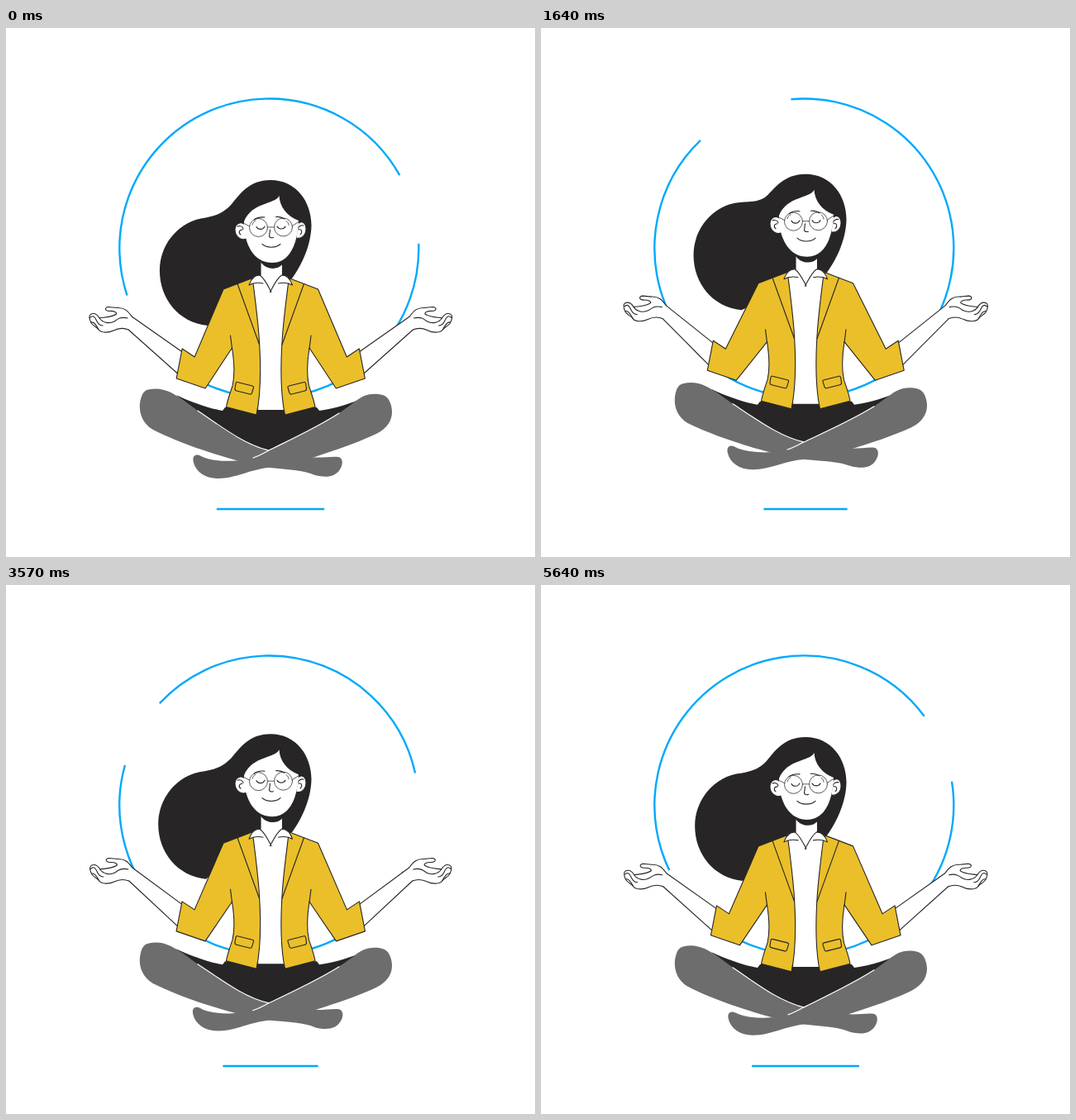
Recreate the animation shown at these times as an HTML page. Size 640 px wide and 640 px high, loop 5.71 s.

```html
<!DOCTYPE html>
<html lang="en">
<head>
<meta charset="utf-8">
<title>Meditation</title>
<style>
  html, body { margin: 0; width: 100%; height: 100%; overflow: hidden; background: #fff; }
  svg { display: block; width: 100vw; height: 100vh; }
  .ring { fill: none; stroke: #00a9fb; stroke-width: 2.4; }
  .ink { fill: #272526; }
  .skin { fill: #fff; stroke: #272526; stroke-width: 1.1; stroke-linejoin: round; stroke-linecap: round; }
  .line { fill: none; stroke: #272526; stroke-width: 1.1; stroke-linecap: round; stroke-linejoin: round; }
  .cloth { fill: #eabf2a; stroke: #272526; stroke-width: 1.1; stroke-linejoin: round; }
  .leg { fill: #6d6d6d; }
  .seam { fill: none; stroke: #fff; stroke-width: 1.2; stroke-linecap: round; }
  .thin { fill: none; stroke: #4a4849; stroke-width: .9; stroke-linecap: round; }
</style>
</head>
<body>
<svg viewBox="0 0 640 640">
  <circle id="ring" class="ring" cx="318.3" cy="266.5" r="181" pathLength="360" stroke-dasharray="124.6 38.8 169.2 27.4"/>
  <path id="floor" class="ring"/>
  <g id="body">
    <path id="hair" class="ink"/>
    <g id="head">
      <path fill="#fff" d="M308 276H334.500V302L321 319L308 302Z"/>
      <path class="line" d="M308 280V300M334.500 280V300"/>
      <path class="ink" d="M308 276H334.500V286C328 293 315 293 308 283Z"/>
      <path class="skin" d="M289 238C284 233 277 237 277 244C277 252 284 258 291 255Z"/>
      <path class="line" d="M280 240C283 239 286 240 287 243M286 244C282 244 281 248 284 250"/>
      <path class="skin" d="M353 237C358 232 363 236 363 243C363 250 358 256 351 254Z"/>
      <path class="line" d="M360 239C357 238 354 240 353 243M354 244C358 243 359 247 356 250"/>
      <path fill="#fff" d="M330.500 203C325 214 298 210 288 234C287 252 295 284 322 284C345 284 353 258 354 233C340 228 331 216 330.500 203Z"/>
      <g class="thin">
        <circle cx="305.500" cy="241.500" r="11"/>
        <circle cx="335.500" cy="241" r="11"/>
        <path d="M316.500 241H324.500M294.800 240L288 236.500M346.300 239.500L354 234.500"/>
        <path d="M298 238C299 235 300 234 302 233M339 233.500C341 235 342 236.500 342 238.500"/>
      </g>
      <path class="line" d="M300 232C304 229 308 228.500 313 229M326.500 228.500C331 228 334 229 337 231"/>
      <path class="line" d="M303 240.500C305 244.500 311 244.500 313 240M328 240C330 244 336 244 338 240"/>
      <path class="line" d="M319.500 244L318.500 252C319 254 321.500 254 323.500 253.500M310 261.500C315 266.500 327 266.500 332 261.500"/>
    </g>
    <path class="ink" d="M206 444C225 453 245 460 262 463L265 459H376L379 463C400 460 418 454 434 447L403 470C370 488 340 504 318 512C290 507 255 485 228 465Z"/>
    <g id="legL">
      <path class="leg" d="M172 437.500C190 433.500 202 442 213 449L232 463C260 483 290 506 318 511L372 519.500C385 520 395 518 402 519C408 520 408 528 404 534C398 544 386 544 374 541C360 535 340 534 320 532L280 523.500C245 514 205 500 177 485.500C162 476 160 460 163 449C165 441 168 438.500 172 437.500Z"/>
      <path class="seam" d="M232 463C260 482 288 504 318 511"/>
    </g>
    <g id="legR">
      <path class="leg" d="M456 444C440 440 429 446 421 453L403 466C375 484 340 500 318 511C311 515 305 518 299 520C285 525 250 526 236 518C228 514 225 519 227 526C230 537 241 545 257 545C278 545 295 534 320 531.500C340 529 355 524 372 519.500C398 511 425 502 448 491C466 482 469 468 466 457C464 449 461 446 456 444Z"/>
      <path class="seam" d="M403 466C375 484 340 500 318 511C311 515 305 518 299 520"/>
    </g>
    <path fill="#fff" d="M297 304L308 299L321 319L334 299L344 304C336 340 332 400 337 462H305C310 400 304 340 297 304Z"/>
    <g id="half">
      <path id="arm" class="skin"/>
      <g id="hand">
        <path class="skin" d="M152 349C147 342 143 338 134 338.500L124 337.500C119 338 119 342 125 342.500C130 342 134 344 133.500 346C128 350 118 350 113 351C110 346 107 344.500 103 346C99 348 101 353 103 357C106 361 110 362 112 365C115 369 124 369 130 366C136 363 143 363 148 365"/>
        <path class="line" d="M147 351C139 349 135 352 131 355C125 358 117 357 113 351M101.500 350.500C106 346 108 351 110 355C112 359 114 360 117 360M103 356C107 355 110 361 112 365"/>
      </g>
      <path id="jacket" class="cloth"/>
      <path class="line" d="M271.500 372L273.500 388M280 309.500L306.500 383"/>
      <path class="line" d="M280 428.500L298 433Q300 433.500 299.500 435L297.500 441.500Q297 443.500 295 443L279 439Q276.500 438.500 277 436L278 430Q278.500 428 280 428.500Z"/>
      <path class="skin" d="M321 319.500C317 312 313 303 307 299C301 299 297 302 294 311C300 307.500 306 308 311 309"/>
    </g>
    <use href="#half" transform="matrix(-1 0 0 1 640.5 0)"/>
  </g>
</svg>
<script>
  const LOOP = 5710, STEP = LOOP / 80, CYCLE = 40.6, LEAD = 0.6, RAD = Math.PI / 180;
  const el = id => document.getElementById(id);
  const set = (id, name, value) => el(id).setAttribute(name, value);
  const swing = (a, lag) => Math.cos(a - lag * RAD) - Math.cos(lag * RAD);

  function draw(ms) {
    const n = Math.floor(((ms % LOOP) + 4) / STEP) % 80;
    const a = (n + LEAD) / CYCLE * 2 * Math.PI;
    const up = (1 - Math.cos(a)) / 2;

    // the ring eases off slightly near the end of the loop
    const turn = n < 64 ? n * 4.495 : 287.7 + (n - 64) * 4.33;
    set('ring', 'transform', `rotate(${turn - 1.8} 318.3 266.5)`);
    const w = 65.2 - 15.6 * up;
    set('floor', 'd', `M${320 - w} 582H${320 + w}`);

    set('body', 'transform', `translate(0 ${-7.8 * up})`);
    set('legL', 'transform', `rotate(${-1.05 * up} 172 460)`);
    set('legR', 'transform', `rotate(${1.05 * up} 456 465)`);

    // loose hair trails behind the body
    const hx = 1.3 * swing(a, -40), hy = 6.5 * swing(a, 45);
    const h = (x, y, pull = 1) => `${x + hx * pull} ${y + hy * pull}`;
    set('hair', 'd', `M320 184C351 184 369.500 210 369.500 239C369 264 357 288 346 303L300 318L262 340L${h(244, 359.5)}
      C${h(209, 356)} ${h(186, 327)} ${h(186, 293)}C${h(186, 260)} ${h(210, 235)} ${h(236, 230)}
      C${h(253, 227)} ${h(262, 225, 0.5)} ${h(273, 213, 0.2)}C283 201 294 184 320 184Z`);

    // sleeves and hands lift further than the torso
    const ex = 2.8 * swing(a, 45), ey = -2.7 * up;
    const e = (x, y) => `${x + ex} ${y + ey}`;
    const px = swing(a, 80), py = -6.5 * up;
    const p = (x, y) => `${x + px} ${y + py}`;
    set('hand', 'transform', `translate(${px} ${py})`);
    set('arm', 'd', `M${p(152, 349)}L${e(221, 397.5)}L${e(213, 423)}L${p(148, 365)}`);
    set('jacket', 'd', `M297 303L263 316L${e(228, 398)}L${e(213, 388)}L${e(206, 424)}L${e(241, 436)}L273.500 387
      C276 403 277 420 274 433C271 442 268 450 266.500 458.500L303 468C309 440 308 400 306 372C304 347 301 325 299 309Z`);
  }

  const start = performance.now();
  function tick() {
    draw(performance.now() - start);
    requestAnimationFrame(tick);
  }
  tick();
</script>
</body>
</html>
```
